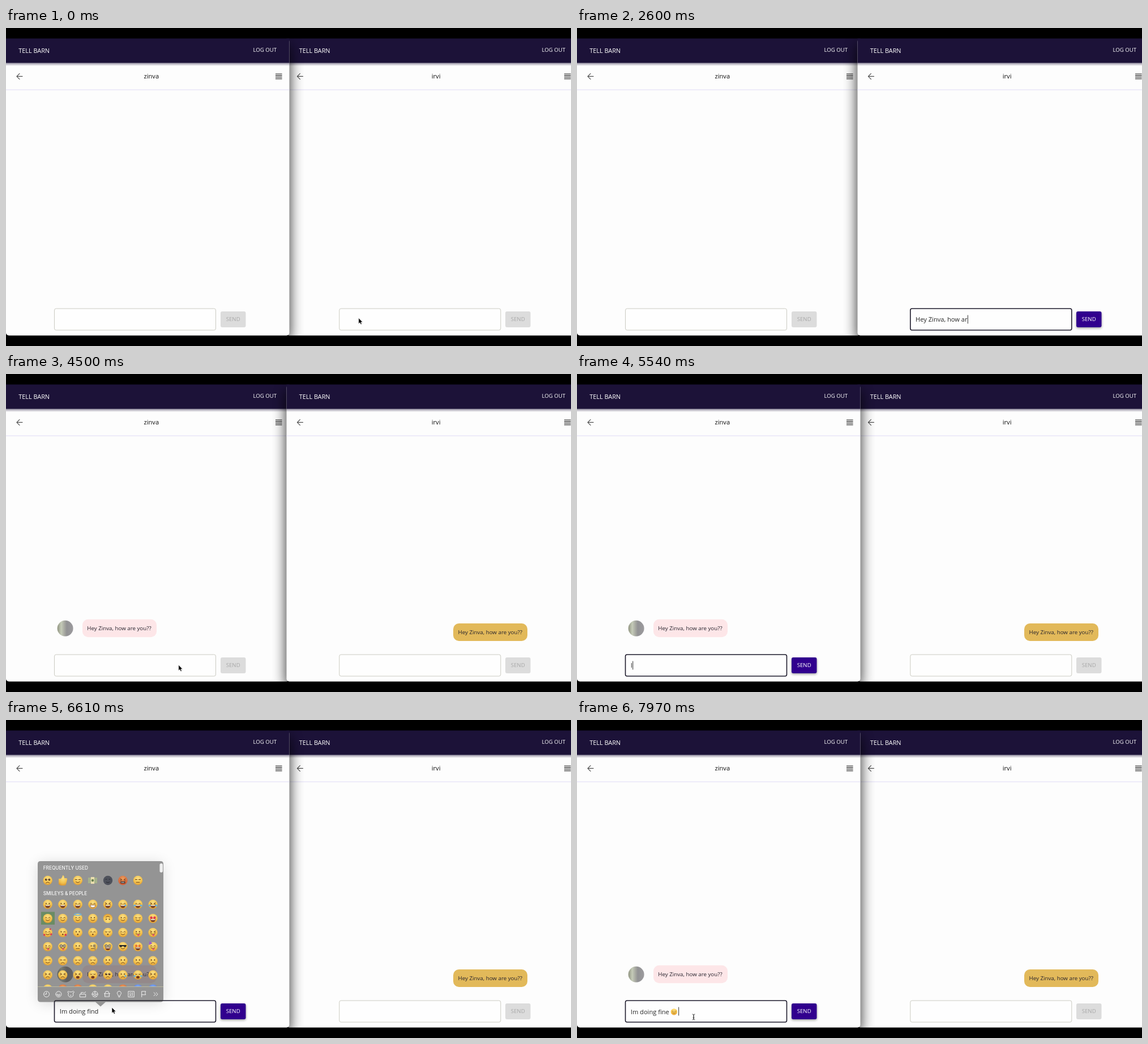
An HTML page for the animation above (8000 ms loop, 998 by 561 pixels).

```html
<!DOCTYPE html>
<html lang="en">
<head>
<meta charset="utf-8">
<title>Chat demo</title>
<style>
  html, body { margin: 0; width: 100%; height: 100%; overflow: hidden; background: #000; }
  svg { display: block; width: 998px; height: 561px; }
  text { font-family: "Open Sans", sans-serif; white-space: pre; }
  .caps { font-size: 9.65px; font-weight: 500; text-anchor: middle; }
  .body { font-size: 11.1px; }
  .note { font-size: 9.75px; fill: #26222c; }
  .label { font: 500 8.3px Inter, sans-serif; fill: #fff; }
  .line { fill: none; stroke-linecap: round; stroke-linejoin: round; }
</style>
</head>
<body>
<svg id="stage" viewBox="0 0 998 561">
  <defs>
    <radialGradient id="skin" cx=".5" cy=".3" r=".75">
      <stop offset="0" stop-color="#ffe585"/><stop offset=".6" stop-color="#fac548"/><stop offset="1" stop-color="#dc9129"/>
    </radialGradient>
    <radialGradient id="red" cx=".5" cy=".3" r=".75">
      <stop offset="0" stop-color="#f2a15a"/><stop offset="1" stop-color="#cf4a24"/>
    </radialGradient>
    <radialGradient id="cold" cx=".5" cy=".3" r=".75">
      <stop offset="0" stop-color="#7fb3ff"/><stop offset="1" stop-color="#4a63d8"/>
    </radialGradient>
    <linearGradient id="photo">
      <stop offset="0" stop-color="#8f9380"/><stop offset=".25" stop-color="#c5cbb8"/>
      <stop offset=".48" stop-color="#a3a49e"/><stop offset=".6" stop-color="#929294"/><stop offset="1" stop-color="#9c9b9e"/>
    </linearGradient>
    <linearGradient id="drop" x2="0" y2="1">
      <stop offset="0" stop-color="#1c1138" stop-opacity=".5"/><stop offset="1" stop-color="#1c1138" stop-opacity="0"/>
    </linearGradient>
    <filter id="soft" x="-20%" y="-20%" width="140%" height="140%"><feGaussianBlur stdDeviation="12"/></filter>
    <filter id="lift" x="-30%" y="-50%" width="160%" height="200%"><feGaussianBlur stdDeviation="2"/></filter>
    <clipPath id="gridClip"><rect x="56" y="249" width="222" height="221"/></clipPath>
  </defs>
  <g id="windows"></g>
  <g id="picker"></g>
  <g id="pointer"></g>
</svg>
<script>
const LOOP = 8000;
const GREETING = 'Hey Zinva, how are you??';
const $ = id => document.getElementById(id);
const clamp = v => Math.max(0, Math.min(1, v));
const ramp = (t, start, length) => clamp((t - start) / length);
const mix = (a, b, p) => `rgb(${a.map((v, i) => Math.round(v + (b[i] - v) * p))})`;
const show = (el, on) => { el.style.display = on ? '' : 'none'; };

const pen = document.createElement('canvas').getContext('2d');
function textWidth(s) {
  pen.font = '11.1px "Open Sans", sans-serif';
  return pen.measureText(s).width;
}

// ---- Faces: first letter = eyes, second = mouth, the rest = extras ----
const stroke = (d, c = '#6b3d12', w = 1) => `<path class="line" d="${d}" stroke="${c}" stroke-width="${w}"/>`;
const dot = (x, y, r, c) => `<circle cx="${x}" cy="${y}" r="${r}" fill="${c}"/>`;
const pair = (r, c) => dot(-2.8, -1.4, r, c) + dot(2.8, -1.4, r, c);
const EYES = {
  d: pair(1.05, '#5a3310'),
  a: stroke('M-4.5-.8q1.6-2.4 3.2 0M1.3-.8q1.6-2.4 3.2 0'),
  c: stroke('M-4.5-1.4q1.6 1.8 3.2 0M1.3-1.4q1.6 1.8 3.2 0'),
  x: stroke('M-4.6-2.8l3 1.5-3 1.3M4.6-2.8l-3 1.5 3 1.3'),
  l: stroke('M-4.6-1.5h3.2M1.4-1.5h3.2'),
  w: dot(-2.8, -1.4, 1.05, '#5a3310') + stroke('M1.3-1q1.6-1.6 3.2 0'),
  h: pair(2.3, '#e5344a'),
  s: pair(2.2, '#f2712c'),
  b: pair(1.9, '#4b2a12') + dot(-2.2, -2, .6, '#fff') + dot(3.4, -2, .6, '#fff'),
  g: pair(2.3, '#fff8dc') + pair(.9, '#5a3310') + stroke('M-.5-1.4h1M-5.1-1.4a2.3 2.3 0 1 0 4.6 0a2.3 2.3 0 1 0-4.6 0M.5-1.4a2.3 2.3 0 1 0 4.6 0a2.3 2.3 0 1 0-4.6 0', '#333', .8),
  k: '<path d="M-6.5-3h13l-.8 3q-2.5 2-5-.8h-1.4q-2.500 2.800-5 .8z" fill="#222"/>'
};
const MOUTHS = {
  o: '<path d="M-4.7 1.200h9.400q-.5 5-4.700 5t-4.700-5z" fill="#75361a"/><path d="M-4 1.500h8l-.4 1.400h-7.200z" fill="#fff"/>',
  r: '<path d="M-4.700 1.200h9.400q-.5 4.500-4.700 4.500t-4.700-4.500z" fill="#fff" stroke="#75361a" stroke-width=".7"/>',
  s: stroke('M-3.4 2.300q3.400 3.200 6.800 0'),
  f: stroke('M-3 4.500q3-3 6 0'),
  l: stroke('M-2.800 3.300h5.600'),
  k: dot(0, 3.2, 1.2, '#6b3d12'),
  t: stroke('M-3.700 2q3.700 2.500 7.400 0') + dot(.8, 4.4, 1.8, '#e8566c'),
  w: '<ellipse cy="4" rx="3" ry="2.300" fill="#75361a"/>'
};
const EXTRAS = {
  T: dot(-5.8, 2, 1.8, '#59b4f0') + dot(5.8, 2, 1.8, '#59b4f0'),
  D: dot(4.6, 2, 1.6, '#59b4f0'),
  H: '<ellipse cy="-7" rx="6" ry="1.800" fill="none" stroke="#62b5ee" stroke-width="1.300"/>',
  Y: dot(-6, 4, 1.8, '#e5344a') + dot(6, 3, 1.8, '#e5344a') + dot(4.5, -6, 1.5, '#e5344a'),
  K: dot(5, 4, 1.9, '#e5344a'),
  P: '<path d="M-7-3l1-7 5 4z" fill="#9a5bd0"/>',
  M: stroke('M.5-1.400a2.300 2.300 0 1 0 4.600 0a2.300 2.300 0 1 0-4.600 0M4 1v5', '#777', .9),
  C: '<path d="M-4 1.500h8v3.600h-8z" fill="#2d2525"/>' + stroke('M-2.600 3.300h5', '#eee')
};
const SKINS = { R: 'red', B: 'cold' };

function face(x, y, code) {
  const [eyes, mouth, ...extra] = code;
  const skin = extra.map(e => SKINS[e]).find(Boolean) || 'skin';
  const turn = extra.includes('U') ? ' rotate(180)' : '';
  return `<g transform="translate(${x} ${y})${turn}"><circle r="8.200" fill="url(#${skin})"/>` +
    EYES[eyes] + MOUTHS[mouth] + extra.map(e => EXTRAS[e] || '').join('') + '</g>';
}

// ---- Chat windows ----
function chatWindow(o) {
  const mid = o.send + 22.2;
  return `<g id="${o.id}">
    <rect x="${o.x}" y="30" width="${o.w}" height="522" opacity=".85" filter="url(#soft)"/>
    <rect x="${o.x}" y="19" width="${o.w}" height="523.500" rx="5" fill="#fdfdfd"/>
    <rect x="${o.x}" y="61" width="${o.w}" height="6" fill="url(#drop)"/>
    <rect x="${o.x}" y="18.500" width="${o.w}" height="43" fill="#1c1238"/>
    <path d="M${o.x} 109h${o.w}" stroke="#dedbf5"/>
    <text x="${o.home}" y="43.600" font-size="10.900" font-weight="500" fill="#fff">TELL BARN</text>
    <text class="caps" x="${o.menu - 24.5}" y="41.600" fill="#fff">LOG OUT</text>
    ${stroke(`M${o.home + 6.8} 85.300h-10M${o.home + 1.7} 80.300l-5 5 5 5`, '#505050', 1.2)}
    <path d="M${o.menu - 5.7} 81.200h11.600m-11.600 2.800h11.600m-11.600 2.800h11.600m-11.600 2.800h11.600" stroke="#3a3a3a" stroke-width="1.300"/>
    <text class="body" x="${o.title}" y="89" text-anchor="middle" fill="#111">${o.name}</text>
    <g class="message">${o.message}</g>
    <rect class="field" x="${o.field}" y="495" width="285" height="38" rx="3" fill="#fefefe"/>
    <text class="body typed" x="${o.field + 9.3}" y="518" fill="#262626"></text>
    <g class="emoji"><g transform="translate(171.400 514.800) scale(.69)">${face(0, 0, 'cs')}</g></g>
    <rect class="caret" y="506.500" width="1" height="15" fill="#333"/>
    <rect class="glow" x="${o.send}" y="502" width="44.500" height="27.500" rx="3" filter="url(#lift)"/>
    <rect class="button" x="${o.send}" y="500" width="44.500" height="28" rx="3"/>
    <text class="caps word" x="${mid}" y="517.300">SEND</text>
  </g>`;
}

$('windows').innerHTML = chatWindow({
  id: 'right', x: 495.5, w: 530, home: 517.7, menu: 991.7, title: 759.6, name: 'irvi', field: 588.8, send: 882,
  message: `<rect x="790" y="440" width="131" height="31" rx="10" fill="#e2b95a"/><text class="note" x="798.500" y="459">${GREETING}</text>`
}) + chatWindow({
  id: 'left', x: 0, w: 500.5, home: 22.2, menu: 481.7, title: 256.8, name: 'zinva', field: 85.5, send: 379,
  message: `<circle cx="104.600" cy="448.800" r="14" fill="url(#photo)"/><rect x="135" y="432.800" width="131" height="31.500" rx="10" fill="#fde6e8"/><text class="note" x="143.300" y="452">${GREETING}</text>`
});

// ---- Emoji picker ----
const ROWS = [
  'do do ao ar xo aoD aoT xoT', 'as as asH ds dsU ws cs ho', 'asY wkK dk ak ck as dt xt',
  'wt gt dl dlM go ks so atP', 'ls lf cf cf df df df df', 'xf xf xw cw bf dfD cwT xf',
  'xf xfR dfR dw dl dwR drB dwB'
].map(r => r.split(' '));
const colX = i => 73.7 + 26.55 * i;

const thumb = '<path d="M93 280h4q3-3 3-6 3 0 3 5h4q2 1 1 3l-2 8q-1 2-3 2h-6l-4-2z" fill="url(#skin)"/>';
const money = '<rect x="145" y="278" width="16" height="10" fill="#a8b58b"/><rect x="150" y="277" width="6" height="12" fill="#f0e3b0"/>' + dot(153, 283, 2.2, '#66804f');
const moon = dot(180, 283, 8.2, '#4a4d58') + stroke('M176 281h2M182 281h2M177 286q3 2 6 0', '#23252c');
const frequent = face(73.7, 283, 'bf') + thumb + face(colX(2), 283, 'ls') + money + moon +
  face(colX(5), 283, 'xfRC') + face(colX(6), 283, 'll');
const grid = ROWS.map((row, r) => row.map((code, i) => face(colX(i), 325.2 + 24.9 * r, code)).join('')).join('');

const ring = 'M-5 0a5 5 0 1 0 10 0a5 5 0 1 0-10 0';
const TABS = [
  ring + 'M0-3v3h-3', ring + 'M-2-1.500v.1M2-1.500v.1M-3 1h6q-3 4-6 0',
  'M-4-2q-3-2 0-3 1 0 2 1h4q3-3 4 0 0 2-2 2 2 7-4 7t-4-7M-1 2h2',
  'M-5 0h10v5h-10zM-3 0v-3h4M2-2l3-2', ring + 'M0-2l2 2-1 2h-2l-1-2zM0-5v3M5 0h-3M-5 0h3M-3 4l2-2M3 4l-2-2',
  'M-4 4v-5l2-4h4l2 4v5zM-5-1h10M-2 2h.1M2 2h.1', 'M-1.500 3q0-2-1.500-3a3.500 3.500 0 1 1 6 0q-1.500 1-1.500 3zM-1 5h2',
  'M-5-5h10v10h-10zM-3-2h3M2-3v6M-3 3l3-3M-3 0l3 3', 'M-3 5v-10h7l-1 3 1 3h-7', 'M-3-3l3 3-3 3M1-3l3 3-3 3'
];
const tabs = TABS.map((d, i) => `<g transform="translate(${71.5 + 21.4 * i} 483.700)">${stroke(d, '#fff', .9)}</g>`).join('');

$('picker').innerHTML = `<g id="plate">
    <rect x="57" y="253" width="220" height="246" rx="5" opacity=".3" filter="url(#soft)"/>
    <path d="M61 249h212q5 0 5 5v238.500q0 5-5 5h-97l-9 8-9-8h-97q-5 0-5-5v-238.500q0-5 5-5z" fill="#2f2f2f"/>
  </g>
  <g id="icons">
    <text class="label" x="65.700" y="264" textContent="">FREQUENTLY USED</text>
    <text class="label" x="65.700" y="309">SMILEYS &amp; PEOPLE</text>
    <rect x="62" y="338.500" width="24" height="22.500" fill="#5d8a56" opacity=".8"/>
    <g clip-path="url(#gridClip)">${frequent}${grid}</g>
    <path d="M56 470.500h222" stroke="#c9c7a4" stroke-width=".8"/>
    ${tabs}
    <rect x="271.500" y="253" width="5.500" height="16" rx="2.700" fill="#f4f4f4"/>
  </g>`;

// ---- Pointer ----
const SHAPES = {
  arrow: '<path d="M0 0v10.200l2.300-2 1.500 3.400 1.900-.8-1.500-3.300h3.100z" fill="#000" stroke="#fff" stroke-width=".7"/>',
  beam: stroke('M-2-5q2 0 2 1.500v7q0 1.500-2 1.500M2-5q-2 0-2 1.500v7q0 1.500 2 1.500M-1 1.500h2', '#333', .9),
  hand: '<path d="M-2.500 1.500v-6q0-1.400 1.200-1.400t1.200 1.400v3.500q2-.7 2.300.4 1.800-.5 2 .6 1.500-.2 1.500 1.200 0 4-1.700 5.300h-4.500q-2-2.200-3.600-4.500 0-1.600 2.100-.2z" fill="#fff" stroke="#333" stroke-width=".9"/>'
};
// time, x, y, shape (empty = hidden)
const PATH = [
  [0, 622.8, 511.5, 'arrow'], [320, 623, 514, 'beam'], [800, 623, 514, ''], [3400, 660, 514, 'beam'],
  [3650, 880, 514, 'hand'], [3760, 908, 514, 'hand'], [4150, 908, 514, 'arrow'], [4620, 190, 513, 'arrow'],
  [4760, 187, 513, 'beam'], [5400, 187, 507, ''], [6540, 187, 507, 'arrow'], [6700, 187, 507, 'arrow'],
  [7020, 74, 350, 'arrow'], [7260, 74, 350, 'arrow'], [7620, 206, 524, 'beam'], [LOOP, 206, 524, 'beam']
];
let shape = null;
function movePointer(t) {
  const i = PATH.findIndex((p, n) => n && t < p[0]) - 1;
  const [t0, x0, y0, kind] = PATH[i], [t1, x1, y1] = PATH[i + 1];
  const p = ramp(t, t0, t1 - t0), e = p * p * (3 - 2 * p);
  $('pointer').setAttribute('transform', `translate(${x0 + (x1 - x0) * e} ${y0 + (y1 - y0) * e})`);
  if (kind !== shape) $('pointer').innerHTML = SHAPES[shape = kind] || '';
}

// ---- State over time ----
const typing = (s, t, start, step) => s.slice(0, Math.max(0, Math.floor((t - start) / step)));
const parts = id => Object.fromEntries(
  ['message', 'field', 'typed', 'emoji', 'caret', 'glow', 'button', 'word'].map(k => [k, $(id).querySelector('.' + k)]));
const left = parts('left'), right = parts('right');

function paint(w, s) {
  show(w.message, s.message);
  w.field.setAttribute('stroke', s.focus ? '#1d1a2b' : '#cbcbc2');
  w.field.setAttribute('stroke-width', s.focus ? 1.6 : 1);
  if (w.typed.textContent !== s.text) w.typed.textContent = s.text;
  w.typed.setAttribute('y', s.emoji ? 518.6 : 518);
  show(w.emoji, s.emoji);
  show(w.caret, s.focus && s.caret);
  w.caret.setAttribute('x', +w.typed.getAttribute('x') + textWidth(s.text) + (s.emoji ? 13.5 : .3));
  w.button.setAttribute('fill', mix([220, 220, 220], [49, 0, 142], s.active));
  w.word.setAttribute('fill', s.pressed || s.active > .3 ? '#fff' : '#a8a8a8');
  w.glow.setAttribute('opacity', s.pressed ? .6 : s.active * .4);
}

let front = '';
function render(t) {
  const top = t >= 320 && t < 4760 ? 'right' : 'left';
  if (top !== front) $('windows').appendChild($(front = top));

  const rightText = t < 3990 ? typing(GREETING, t, 740, 109) : '';
  const blink = since => Math.floor((t - since) / 500) % 2 === 0;
  paint(right, {
    text: rightText, message: t >= 3860, emoji: false,
    focus: t >= 320 && t < 3790,
    caret: blink(t < 849 ? 320 : t < 3360 ? t : 3360),
    active: ramp(t, 849, 60) * (1 - ramp(t, 3800, 110)),
    pressed: t >= 3640 && t < 4000
  });

  const picked = t >= 7220;
  const leftText = picked ? 'Im doing fine ' : typing('Im doing find ', t, 5400, 80);
  paint(left, {
    text: leftText, message: t >= 4050, emoji: picked,
    focus: t >= 4760,
    caret: (t < 6540 || picked) && blink(t < 5480 ? 4760 : t < 7220 ? t : t < 7600 ? 7220 : 7600),
    active: ramp(t, 5480, 50), pressed: false
  });

  const open = ramp(t, 6540, 140) * (1 - ramp(t, 7220, 160));
  show($('picker'), open > 0);
  $('plate').setAttribute('opacity', Math.min(open, .78));
  $('icons').setAttribute('opacity', Math.min(1, open * 1.85));
  movePointer(t);
}

const begin = performance.now();
(function tick() {
  render((performance.now() - begin) % LOOP);
  requestAnimationFrame(tick);
})();
</script>
</body>
</html>
```
